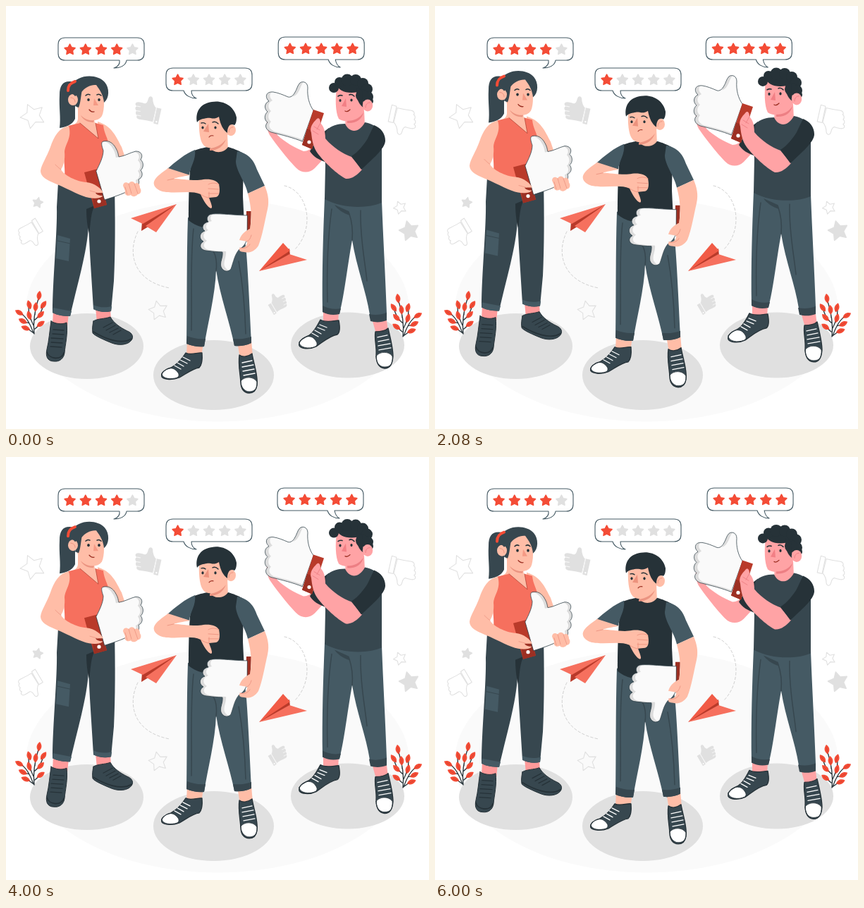
Recreate the animation shown at these times as an HTML page with a canvas. Size 600 by 600 pixels, loop 6.04 s.

```html
<!DOCTYPE html>
<html lang="en">
<head>
<meta charset="utf-8">
<title>Customer ratings</title>
<style>
html, body { margin: 0; width: 100%; height: 100%; overflow: hidden; background: #fff; }
canvas { display: block; width: 600px; height: 600px; }
</style>
</head>
<body>
<canvas id="stage" width="600" height="600"></canvas>
<script>
const ctx = document.getElementById('stage').getContext('2d');
const LOOP = 6040, RISE = 12;
const INK = '#263238', SLATE = '#37474f', STEEL = '#455a64', GREY = '#e0e0e0';
const RED = '#f44c36', CORAL = '#f6705e', CUFF = '#b93a2a', DARKRED = '#9c3023';
const PEACH = '#ffbda7', PINK = '#ffa3a5', ROSE = '#ff9a9a', SHADE = '#eb9481', BLUSH = '#ed7f84';
const WHITE = '#fff', HAND = '#fafafa';

const cache = new Map();
function path(d) {
  if (!cache.has(d)) cache.set(d, new Path2D(d));
  return cache.get(d);
}
function fill(color, d) {
  ctx.fillStyle = color;
  ctx.fill(path(d));
}
function line(color, width, d) {
  ctx.strokeStyle = color;
  ctx.lineWidth = width;
  ctx.stroke(path(d));
}
function oval(color, x, y, rx, ry = rx, rot = 0) {
  ctx.fillStyle = color;
  ctx.beginPath();
  ctx.ellipse(x, y, rx, ry, rot, 0, 7);
  ctx.fill();
}
function at(x, y, draw) {
  ctx.save();
  ctx.translate(x, y);
  draw();
  ctx.restore();
}

function star(x, y, r, color, outline, rot = 0) {
  at(x, y, () => {
    ctx.rotate(rot);
    ctx.beginPath();
    for (let i = 0; i < 10; i++) {
      const a = i * Math.PI / 5 - Math.PI / 2, d = i % 2 ? r * .52 : r;
      ctx.lineTo(d * Math.cos(a), d * Math.sin(a));
    }
    ctx.closePath();
    ctx.lineWidth = outline ? 1.1 : 1.6;
    ctx.strokeStyle = color;
    ctx.stroke();
    if (!outline) { ctx.fillStyle = color; ctx.fill(); }
  });
}

function bubble(x, y, score, tail) {
  at(x, y, () => {
    const d = 'M10 0H112Q122 0 122 10V22Q122 32 112 32H' + tail + 'H10Q0 32 0 22V10Q0 0 10 0Z';
    fill(WHITE, d);
    line(STEEL, 1.1, d);
    for (let i = 0; i < 5; i++) star(16.6 + i * 22.2, 17, 7.8, i < score ? RED : GREY);
  });
}

const UP_LEFT = 'M436 148C430 140 427 128 428 116C428 108 421 106 417 109C413 113 413 118 409 124C407 127 404 130 400 129C393 126 386 123 379 122C368 121 367 130 373 135C366 138 366 146 371 150C366 154 366 162 371 165C366 170 369 176 376 179C392 183 408 187 420 192Z';
const UP_RIGHT = 'M128 234C133 224 138 214 138 205C136 199 134 193 138 192C145 190 152 194 156 202C159 207 159 210 160 214C168 213 176 208 184 206C192 206 195 212 191 218C196 222 195 230 191 233C195 238 193 244 188 246C190 252 187 256 183 258C170 265 156 270 140 275Z';
const DOWN = 'M342 297C325 297 305 294 293 295C286 295 283 302 287 306C278 308 277 316 282 319C273 322 274 331 280 334C273 338 275 346 284 347C292 348 300 349 307 349C308 357 303 363 305 370C308 377 315 378 319 373C323 362 324 353 331 345C337 342 341 335 342 330Z';

function bigHand(d, dx, dy) {
  ctx.save();
  ctx.clip(path(d));
  fill('#dcdcdc', d);
  at(dx, dy, () => fill(HAND, d));
  ctx.restore();
  line(SLATE, .8, d);
}

function icon(x, y, sx, sy, deg, solid) {
  at(x, y, () => {
    ctx.rotate(deg * Math.PI / 180);
    ctx.scale(sx, sy);
    ctx.translate(-409.5, -155);
    for (const d of [UP_LEFT, 'M438 147L453 152L436 203L422 197Z']) {
      if (solid) fill(GREY, d);
      else line(GREY, 1.1 / Math.abs(sx), d);
    }
    if (solid) {
      line('#f5f5f5', 3, 'M374 135L384 138M372 150L382 153M372 165L382 168M437 147L421 195');
      oval(WHITE, 432, 193, 3);
    }
  });
}

function leaf(x, y, deg) {
  at(x, y, () => {
    ctx.rotate(deg * Math.PI / 180);
    fill(RED, 'M0 6.5C-5 2 -4 -3 0 -7C4 -3 5 2 0 6.5Z');
    line(CUFF, .5, 'M0 6V-3');
  });
}
const LEAVES = [[47, 411, 8], [33, 424, -15], [53, 424, 35], [19, 435, -60],
  [33, 439, -15], [42, 427, 5], [49, 438, 45], [28, 457, -70], [24, 447, -62], [49, 451, 55]];
function plant() {
  line(INK, 1.3, 'M40 465C38 445 41 430 46 415M39 453C33 441 32 432 32 427M40 446C46 441 48 438 52 428M41 438L42 428M39 464C34 450 28 440 21 436M33 450L27 448M41 458L48 452M38 463L31 458');
  for (const l of LEAVES) leaf(...l);
}

function backdrop() {
  fill(WHITE, 'M0 0H600V600H0Z');
  oval('#fafafa', 300, 432, 272, 157.5);
  oval(GREY, 114.5, 482.5, 80.5, 46.5);
  oval(GREY, 294.5, 523.5, 85.5, 49.5);
  oval(GREY, 484.5, 481, 80.5, 46.5);

  star(38, 156, 18, GREY, true, -.43);
  star(45, 279, 7.5, GREY, false, .2);
  star(216, 432, 14, GREY, true, -.2);
  star(559, 286, 9.5, GREY, true, -.38);
  star(572, 319, 14.5, GREY, false, -.25);
  icon(202, 149, .43, .43, -6, true);
  icon(385, 422, -.31, .31, -12, true);
  icon(35, 322, .4, -.4, -12);
  icon(561.5, 160.5, .45, .45, 174);

  ctx.setLineDash([3.5, 3]);
  line('#cfcfcf', 1, 'M187 320C172 350 180 390 232 400M395 255C428 262 440 315 409 346');
  ctx.setLineDash([]);

  fill(CUFF, 'M242 281L193 306L192 319L205 311Z');
  fill(CORAL, 'M242 281L177 301L194 309Z');
  fill(CORAL, 'M242 281L198 312L213 321Z');
  fill(CUFF, 'M359 376L402 344L403 354L385 365Z');
  fill('#f15b46', 'M359 376L393 336L403 347Z');
  fill(CORAL, 'M359 376L402 352L427 360Z');

  plant();
  at(603, 4, () => { ctx.scale(-1, 1); plant(); });
  bubble(74, 45, 4, '97C96 39 89 43 79 43C85 41 88 38 87 32');
  bubble(227, 88, 1, '36C36 38 38 41 43 43C35 43 27 39 25 32');
}

function woman() {
  // ankles and shoes
  fill(ROSE, 'M67 432L89 436L87 454L66 452ZM127 428L148 430L149 446L129 449Z');
  const left = 'M64 447C70 451 80 452 86 449C88 465 84 480 83 492C82 500 76 505 68 504C58 504 56 496 58 487C61 475 62 460 64 447Z';
  const right = 'M124 447C130 443 140 444 148 441C153 450 162 456 172 461C180 464 181 470 178 474C173 481 160 482 150 478C140 474 126 468 123 464C122 458 123 452 124 447Z';
  for (const d of [left, right]) { fill(SLATE, d); line(INK, 1, d); }
  line(INK, 1.7, 'M58 491C61 501 78 503 82 492M124 462C140 472 164 481 178 472');
  line(INK, 1.3, 'M67 459L82 460M66 465L82 466M64 471L81 472M64 477L80 478M63 483L79 484M138 456L151 449M142 460L155 453M147 463L159 457M152 466L163 460');

  // trousers
  fill(SLATE, 'M74 250L154 258C155 300 155 350 153 390L149 433C141 435 132 434 124 430L119 350L117 312C115 350 101 395 91 440C83 440 73 439 66 435C66 390 73 320 72 285Z');
  fill(INK, 'M114 288L126 283C120 292 120 310 118 322C115 312 114 298 114 288Z');
  fill(STEEL, 'M73 325L91 330L89 362L71 358ZM67 428L93 433L91 440C82 440 73 439 66 435ZM124 424C132 428 142 428 150 426L149 433C141 435 132 434 124 430Z');
  line(SLATE, 1, 'M73 333L91 337');

  // hair behind, neck, body
  fill(SLATE, 'M98 108C82 104 76 111 76 126C75 145 78 158 76 173C84 172 94 169 98 160Z');
  fill(PEACH, 'M130 164C150 170 156 185 164 200L168 212L150 230L130 200Z');
  fill(PEACH, 'M102 146L124 155L126 166L138 170L132 194L88 185L89 171C95 168 101 168 102 160Z');
  fill(CORAL, 'M88 170L105 166L131 188L127 166L138 169C139 181 145 188 146 198L131 254C115 252 95 251 82 250C85 238 82 222 82 210C82 195 92 185 88 170Z');
  line(DARKRED, .6, 'M105 166L131 188L127 166');

  // head
  fill(PEACH, 'M99 118C105 110 128 108 136 116C140 128 140 148 136 156C131 164 118 164 110 159C103 152 99 140 99 130Z');
  fill(SHADE, 'M106 155C112 161 119 163 125 162L124 165C115 165 109 161 106 155Z');
  fill(SLATE, 'M98 142C100 134 99 126 101 122L108 119C106 128 106 137 103 144Z');
  oval(PEACH, 95, 133, 7, 8);
  line(SHADE, 1, 'M92 130C96 130 98 133 98 136');
  fill(SLATE, 'M98 128C101 126 105 124 108 121C115 113 122 112 128 112C133 119 138 126 139 137C147 131 147 116 140 108C132 99 115 97 103 103C94 107 90 115 88 124C92 123 96 125 98 128Z');
  line(RED, 4, 'M88 120C88 112 92 109 98 107');
  line(INK, 1.5, 'M113 127Q116 124 119 126M129 126Q132 124 135 127');
  oval(INK, 117, 133, 1.8, 2.1);
  oval(INK, 132, 133, 1.8, 2.1);
  fill('#f59a85', 'M125 131L131 141L124 141Z');
  line(DARKRED, 1.3, 'M118 147Q121 151 125 150');

  // thumb sign and arms
  fill(CUFF, 'M111 236L130 231L143 282L125 287Z');
  fill(DARKRED, 'M121 260L136 263L143 282L125 287Z');
  bigHand(UP_RIGHT, -4, 1);
  oval(WHITE, 132, 277, 2.6);
  fill(PEACH, 'M89 170C75 173 68 185 63 200C58 214 50 225 49 234C49 242 58 247 70 252C92 261 106 270 118 272C126 274 137 272 137 269C131 269 128 267 127 265L138 265C136 260 126 251 114 250C100 249 82 240 78 232C82 226 84 217 83 207C84 195 94 187 89 170Z');
  line(SHADE, .8, 'M78 232C75 230 72 227 70 225M119 262L130 265');
  fill(PEACH, 'M166 255C166 250 171 249 174 252C176 248 181 248 183 252C187 249 190 253 190 258C193 262 191 267 187 267C184 271 179 271 177 268C172 271 167 267 169 262Z');
  line(SHADE, .8, 'M174 252L178 266M182 252L187 266M169 257L172 267');
}

function sneaker(body, toe, laces) {
  fill(SLATE, body);
  fill(WHITE, toe);
  line(INK, 1.3, body);
  line(INK, .8, toe);
  line(WHITE, 1.3, laces);
}

function middleMan() {
  fill(PEACH, 'M257 474L280 478L277 498L256 496ZM328 476L348 474L350 498L332 500Z');
  sneaker('M255 492C262 496 272 491 278 492C279 503 278 509 274 513C265 514 255 522 246 527C236 531 224 530 221 526C219 520 226 515 234 513C243 508 250 500 255 492Z',
    'M221 522C226 513 235 512 240 516C245 520 247 524 243 527C234 530 222 529 221 522Z',
    'M239 510L248 515M243 506L252 511M247 502L257 507M251 498L261 503');
  sneaker('M331 495C336 499 344 497 349 493C352 510 358 525 356 538C355 545 352 549 345 549C337 549 333 542 333 534C332 520 329 508 331 495Z',
    'M333 532C338 525 351 525 356 533C357 543 352 547 345 547C338 547 333 540 333 532Z',
    'M335 506L349 503M335 512L351 509M336 518L352 515M337 524L353 521');

  fill(STEEL, 'M258 300L336 308L341 350C344 390 346 440 348 478C340 482 331 483 324 482C318 450 303 410 298 374C297 410 286 450 281 483C272 484 263 482 256 479C257 420 256 360 258 300Z');
  fill(SLATE, 'M257 468C264 471 274 473 283 472L281 483C272 484 263 482 256 479ZM322 472C331 473 340 472 348 469V478C340 482 331 483 324 482Z');
  line(SLATE, 1.5, 'M266 316C261 360 264 410 263 460M298 376C300 360 296 348 292 347M330 362C336 395 339 430 340 465');

  fill(PEACH, 'M289 190L314 180L315 206C308 214 294 214 288 206Z');
  fill(INK, 'M267 205C275 202 284 200 289 200C293 209 308 210 315 200C322 202 330 205 335 208C338 230 336 250 336 270L338 312C310 321 275 318 259 304C259 270 260 240 262 225Z');
  fill(STEEL, 'M268 204C255 209 240 221 229 231L260 240C261 228 270 218 268 204ZM328 206C345 209 352 220 356 232L367 255L343 266C340 250 326 234 326 220Z');

  // head
  fill(PEACH, 'M274 154L304 152L316 168C316 182 313 190 306 196C298 202 288 203 282 199C275 194 273 178 274 154Z');
  fill(SHADE, 'M289 202C299 201 307 196 312 189C309 198 301 205 289 205Z');
  oval(PEACH, 319, 176, 7, 8.3);
  line(SHADE, 1, 'M322 172C318 172 316 175 316 179');
  fill(INK, 'M271 165C268 150 276 138 292 136C308 133 324 142 327 158C327 164 326 167 324 169C318 166 314 171 314 180C308 176 304 168 302 157C295 162 290 158 285 159C280 160 275 160 271 165Z');
  line(INK, 1.4, 'M277 166Q280 165 283 167M293 165Q297 163 301 167');
  oval(INK, 279, 172.5, 1.6, 2.1);
  oval(INK, 297, 172.5, 1.6, 2.1);
  fill('#ec927d', 'M287 167L280 178L288 179Z');
  line(DARKRED, 1.1, 'M288 186Q290 183 294 184');

  // sign and arms
  fill(DARKRED, 'M341 291L348 291L346 325L340 334Z');
  bigHand(DOWN, 5, -1);
  fill(PEACH, 'M230 230L261 240C250 242 243 243 238 245C250 245 268 249 280 246C290 245 299 247 302 253C304 262 303 270 298 271L288 272C290 278 294 286 291 287C286 286 280 276 276 267C262 261 245 266 230 264C215 264 208 255 210 249C212 242 222 236 230 230Z');
  line(SHADE, .9, 'M238 245L229 247M287 253C292 250 298 251 302 253M287 259L302 260M287 266L301 266M276 267C280 270 285 272 288 272L288 264');
  fill(PEACH, 'M343 266L367 255C371 265 374 275 371 288C367 305 364 325 358 340C353 348 345 351 338 349C332 349 329 346 332 343C339 344 343 338 342 334L331 332C334 322 342 318 346 316C349 300 348 285 343 266Z');
  line(SHADE, .9, 'M342 334C346 332 347 328 348 325M332 343C338 345 344 342 346 338');
}

function rightMan() {
  fill(PINK, 'M450 430L472 434L471 450L450 450ZM518 440L539 438L542 462L525 465Z');
  sneaker('M446 445C455 450 465 446 472 446C474 456 474 463 470 466C458 468 448 478 440 483C430 488 418 486 416 482C414 474 424 470 430 467C438 462 442 452 446 445Z',
    'M416 477C421 468 431 467 436 471C441 476 443 480 439 483C430 487 416 485 416 477Z',
    'M434 464L443 469M438 460L447 465M442 456L452 460M445 452L455 456');
  sneaker('M524 462C530 462 538 461 542 457C545 470 549 485 549 497C548 508 545 514 537 514C528 513 525 505 525 495C526 482 522 472 524 462Z',
    'M525 497C529 490 543 489 548 497C549 508 545 512 537 512C529 512 525 505 525 497Z',
    'M527 470L541 467M528 476L543 473M528 482L545 479M529 488L546 485');

  fill(STEEL, 'M452 272L533 276C535 330 538 380 540 436C532 439 524 440 516 438C511 405 497 370 491 332C484 370 480 410 473 436C464 438 456 437 449 434C448 380 450 320 452 272Z');
  fill(SLATE, 'M449 425C456 429 466 431 475 429L473 437C464 439 456 438 449 434ZM515 437C524 439 532 438 540 435V446C532 449 524 449 517 447Z');
  line(SLATE, 1.5, 'M462 288C456 330 455 380 456 420M491 332C493 310 488 298 486 292M503 290C502 330 509 360 512 390');
  fill(SLATE, 'M466 282L486 291L488 297C478 294 470 288 466 282Z');

  // far arm and torso
  fill(PINK, 'M372 155C368 165 370 175 374 183C385 199 402 220 412 230C419 237 430 238 438 230L452 215L437 198C432 203 428 206 422 206C410 201 395 193 385 183Z');
  fill(INK, 'M458 173C445 182 439 192 431 206C436 214 444 218 452 221L462 195Z');
  fill(PINK, 'M482 155L508 148L509 170C502 182 488 182 481 171Z');
  fill(SLATE, 'M481 167C470 167 461 170 455 176C450 192 452 210 453 226L452 274C476 287 512 288 533 279L533 200C540 184 528 168 509 165C502 179 488 182 481 167Z');

  // head
  fill(PINK, 'M469 116L505 112C511 128 511 146 504 155C496 164 480 166 472 160C467 150 467 132 469 116Z');
  fill(BLUSH, 'M484 163C494 163 502 159 507 151C505 161 496 167 484 166Z');
  oval(INK, 490, 112, 20, 11);
  for (const [x, y, r] of [[465, 116, 7], [473, 108, 7], [484, 105, 8.5], [496, 105, 8], [506, 110, 8], [512, 118, 8], [513, 129, 8], [505, 127, 9], [516, 135, 5]]) oval(INK, x, y, r);
  fill(INK, 'M497 116L505 120L507 144C502 141 499 135 498 130Z');
  oval(PINK, 513, 141, 7.2, 8.5);
  line(BLUSH, 1, 'M516 137C512 137 510 140 510 144');
  line(INK, 1.6, 'M471 128Q474 126 477 127M487 126Q490 124 494 128');
  oval(INK, 474, 134, 1.6, 2.1);
  oval(INK, 490, 133.5, 1.6, 2.1);
  fill('#f27f85', 'M482 131L476 142L483 143Z');
  line(DARKRED, 1.3, 'M481 149Q484 151 488 147');

  // sign and near arm
  bigHand(UP_LEFT, 5, -1);
  fill(CUFF, 'M436 147L451 152L434 203L420 197Z');
  fill(DARKRED, 'M427 174L440 180L434 203L420 197Z');
  oval(WHITE, 430, 193, 2.6);
  fill(PINK, 'M433 180C430 172 436 165 440 161C443 157 446 160 446 166C450 170 453 176 453 188C464 201 477 209 490 214L505 232C498 240 490 246 482 245C470 239 452 222 442 209C436 201 434 190 433 180Z');
  line(BLUSH, .9, 'M437 171L445 176M435 177L443 182M446 166L441 175');
  fill(INK, 'M522 169C532 173 538 181 538 191C538 202 520 217 504 232L490 213C500 207 508 196 513 188Z');
}

const bob = (t, period) => -RISE * (1 - Math.abs(1 - 2 * (t % period) / period));

const JOLT = [0, -1.2, 0, -2.4, 2.4, -2.4, 2.4, -2.4, 0, -1.2, 0];
function jolt(t) {
  const p = t % (LOOP / 2) / (LOOP / 2) * 10, i = Math.floor(p);
  return JOLT[i] + (JOLT[i + 1] - JOLT[i]) * (p - i);
}

ctx.lineCap = ctx.lineJoin = 'round';
const start = performance.now();
function draw() {
  const t = (performance.now() - start) % LOOP;
  backdrop();
  bubble(386.2 + jolt(t), 44, 5, '81C82 37 84 41 88 43C80 43 73 39 71 32');
  at(0, bob(t, LOOP / 2), woman);
  at(0, bob(t, LOOP / 4), rightMan);
  at(0, bob(t, LOOP), middleMan);
  requestAnimationFrame(draw);
}
draw();
</script>
</body>
</html>
```
